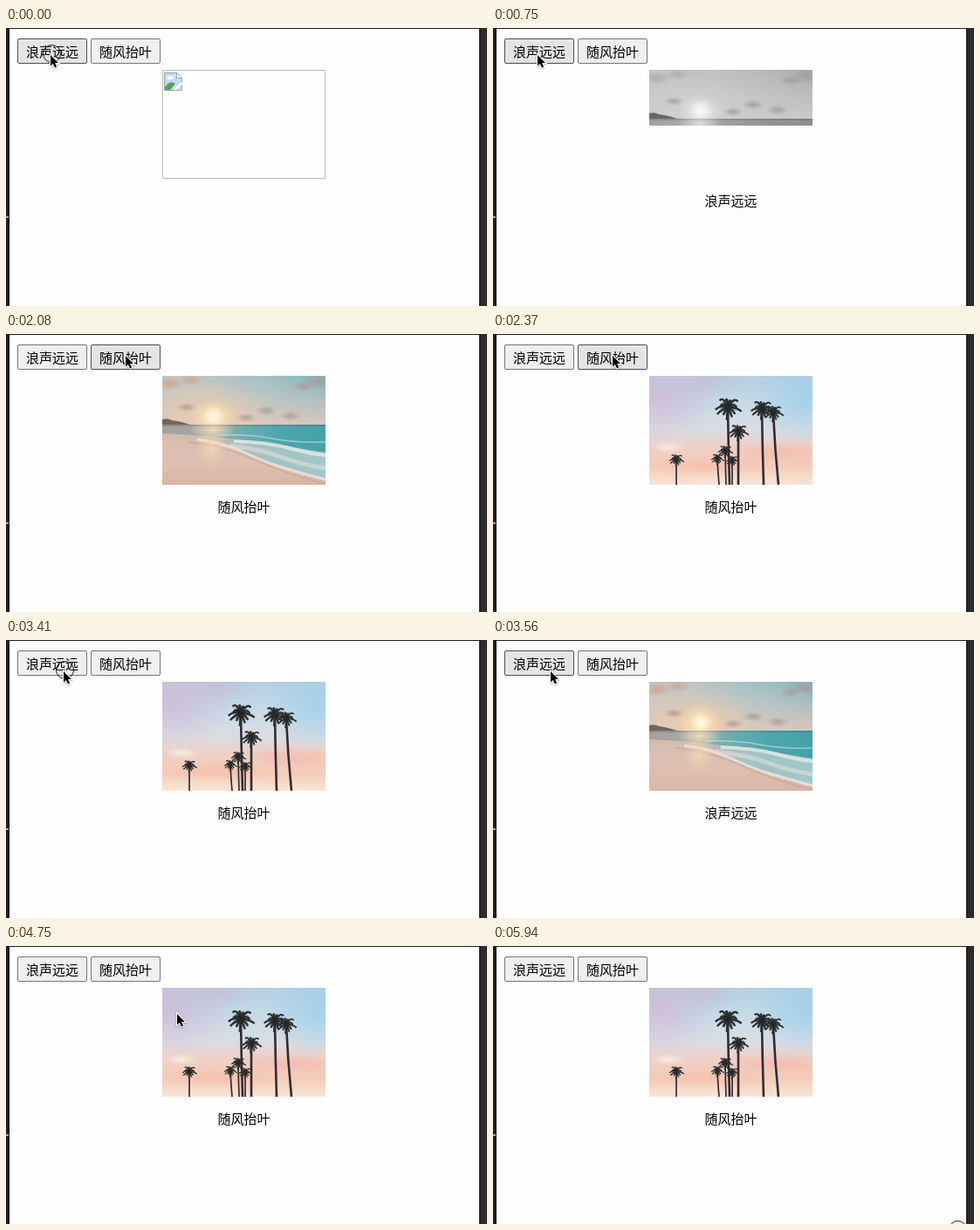
Recreate the animation shown at these times as an HTML page with a canvas. Size 551 by 319 pixels, loop 6.04 s.

```html
<!DOCTYPE html>
<html lang="zh">
<head>
<meta charset="utf-8">
<style>
html, body { margin: 0; width: 100%; height: 100%; overflow: hidden; background: #fefefe; }
#stage { position: absolute; left: 0; top: 0; width: 551px; height: 319px; overflow: hidden;
  font: 15px/20px "Noto Sans CJK SC", "Noto Sans CJK", sans-serif; color: #000; }
#stage > * { position: absolute; box-sizing: border-box; }
.edge { background: #1f1f21; }
.btn { top: 12px; width: 80px; height: 29px; line-height: 27px; text-align: center; white-space: nowrap;
  background: #efefef; border: 1px solid #767676; border-radius: 2px; }
.btn.hover { background: #e4e4e4; border-color: #4f4f4f; }
.btn.down { background: #f5f5f5; border-color: #8d8d8d; }
.pic { left: 179px; top: 48px; width: 187px; height: 125px; }
#broken { border: 1px solid #bdbdbd; }
#caption { left: 179px; top: 188px; width: 187px; text-align: center; }
#over { left: 0; top: 0; }
</style>
</head>
<body>
<div id="stage">
  <div class="edge" style="left:0;top:0;width:4px;height:319px;border-right:1px solid #0c0c0c"></div>
  <div class="edge" style="left:0;top:0;width:551px;height:1px"></div>
  <div style="left:542px;top:0;width:9px;height:319px;background:linear-gradient(90deg,#1c1c1e 1px,#2c2c2e 2px)"></div>
  <div style="left:0;top:216px;width:3px;height:2px;background:#a8a8a8"></div>
  <div class="btn" style="left:13px">浪声远远</div>
  <div class="btn" style="left:97px">随风抬叶</div>
  <div id="broken" class="pic">
    <svg width="24" height="24" style="display:block">
      <path d="M1.5 2.5H15.5L21.5 8.5V22.5H1.5Z" fill="#c4daf5" stroke="#9aa3ad"/>
      <path d="M15.5 2.5V8.5H21.5Z" fill="#fff" stroke="#9aa3ad"/>
      <ellipse cx="8" cy="8" rx="4" ry="2" fill="#fff"/>
      <path d="M2 22V19Q8 10 14 15L8 22Z" fill="#52a552"/>
      <path d="M22 14L13 22" stroke="#fefefe" stroke-width="3"/>
    </svg>
  </div>
  <canvas id="beach" class="pic" width="187" height="125"></canvas>
  <canvas id="palms" class="pic" width="187" height="125"></canvas>
  <div id="caption"></div>
  <canvas id="over" width="551" height="319"></canvas>
</div>
<script>
const $ = id => document.getElementById(id);
const W = 187, H = 125, LOOP = 6040;
const btns = [...document.querySelectorAll('.btn')];
const titles = btns.map(b => b.textContent);
const over = $('over').getContext('2d');

function linear(c, x0, y0, x1, y1, ...colors) {
  const g = c.createLinearGradient(x0, y0, x1, y1);
  colors.forEach((col, i) => g.addColorStop(i / (colors.length - 1), col));
  return g;
}
function rect(c, fill, x = 0, y = 0, w = W, h = H) {
  c.fillStyle = fill;
  c.fillRect(x, y, w, h);
}
function glow(c, x, y, r, rgb, a, sy = 1) {
  c.save();
  c.translate(x, y);
  c.scale(1, sy);
  const g = c.createRadialGradient(0, 0, 0, 0, 0, r);
  g.addColorStop(0, `rgba(${rgb},${a})`);
  g.addColorStop(1, `rgba(${rgb},0)`);
  rect(c, g, -r, -r, 2 * r, 2 * r);
  c.restore();
}
function shape(c, path, fill) {
  c.fillStyle = fill;
  c.fill(new Path2D(path));
}
function line(c, path, color, width) {
  c.strokeStyle = color;
  c.lineWidth = width;
  c.stroke(new Path2D(path));
}

function drawBeach(c) {
  rect(c, linear(c, 0, 0, W, 0, '#c9c4c0', '#b9c3c4', '#9fc0c4', '#82b4bd'), 0, 0, W, 57);
  rect(c, linear(c, 0, 0, 0, 57, 'rgba(222,205,194,0)', 'rgba(222,203,192,.5)', 'rgba(222,200,188,.95)'), 0, 0, W, 57);
  glow(c, 55, 46, 70, '246,206,164', .7, .55);
  const cloud = (x, y, r, rgb = '168,150,148') => glow(c, x, y, r, rgb, .8, .45);
  cloud(8, 9, 18, '205,160,135');
  cloud(33, 5, 14, '205,160,135');
  cloud(179, 7, 18); cloud(162, 12, 13); cloud(96, 48, 12);
  cloud(119, 40, 13); cloud(147, 46, 13); cloud(28, 36, 12);
  glow(c, 59, 47, 25, '255,232,180', 1, .8);
  glow(c, 59, 47, 13, '255,252,232', 1);
  shape(c, 'M0 50Q6 48 11 51Q20 52 32 56H0Z', '#74645a');

  // wet sand, sea, then foam
  rect(c, linear(c, 0, 56, 0, H, '#cdb4aa', '#dabfb2', '#dfbfb0', '#d9b4a5'), 0, 56, W, 69);
  shape(c, 'M40 56H187V119Q160 112 131 103T92 87T40 72Z',
    linear(c, 40, 0, W, 0, 'rgba(178,176,171,0)', '#adbfbb', '#9fc4c4', '#a3c8c9'));
  shape(c, 'M0 56H187V88Q140 80 94 74T0 66Z', linear(c, 0, 0, W, 0, '#a8a09d', '#a3aaa6', '#6cadaf', '#4ba5ac', '#45a1aa'));
  rect(c, linear(c, 0, 0, W, 0, '#8f8986', '#969a96', '#4a979e', '#3c8d98'), 0, 56, W, 2);
  line(c, 'M64 68Q100 67 126 72T187 76', 'rgba(211,228,226,.6)', 1.5);
  line(c, 'M82 75Q120 76 146 83T187 91', 'rgba(228,232,231,.85)', 4);
  line(c, 'M76 80Q112 84 136 93T187 106', 'rgba(224,224,222,.6)', 5);
  line(c, 'M40 73Q68 76 92 87T131 103T187 119', 'rgba(232,225,220,.9)', 3);
  line(c, 'M30 76Q68 80 96 92T140 110T187 124', 'rgba(189,164,154,.5)', 2);
  glow(c, 58, 62, 26, '255,226,185', .85, .45);
  glow(c, 57, 83, 18, '250,220,180', .7, 1.2);
}

function palm(c, x, y, r, foot) {
  line(c, `M${x} ${y}Q${x + (foot - x) * .3} ${(y + H) / 2} ${foot} ${H}`, '#302c35', r > 11 ? 2.6 : 1.7);
  for (let i = 0; i < 13; i++) {
    const a = i / 13 * Math.PI * 2 + .2, k = r * (.8 + .2 * Math.cos(i * 4));
    const dx = Math.cos(a) * k, dy = Math.sin(a) * k * .8;
    line(c, `M${x} ${y}Q${x + dx * .6} ${y + dy - r * .2} ${x + dx} ${y + dy + r * .15}`, '#2b302f', r * .15);
  }
  glow(c, x, y, r * .65, '35,37,38', 1);
}

function drawPalms(c) {
  rect(c, linear(c, 0, 0, 0, H, '#b5cfe3', '#c0d6e6', '#cddce7', '#dbdce2', '#efcfc4', '#f4cbb8', '#f8e6d6'));
  glow(c, 8, 24, 74, '212,180,210', .75, .7);
  glow(c, 65, 5, 44, '202,184,214', .6, .5);
  glow(c, 182, 28, 64, '151,207,235', .75, .8);
  glow(c, 150, 87, 66, '246,177,159', .55, .2);
  glow(c, 62, 103, 70, '246,184,163', .5, .17);
  glow(c, 22, 82, 20, '250,241,229', .85, .35);
  palm(c, 31, 96, 9, 31);
  palm(c, 78, 95, 8, 80);
  palm(c, 95, 97, 8, 95);
  palm(c, 87, 86, 9, 88);
  palm(c, 102, 64, 12, 102);
  palm(c, 90, 36, 16, 92);
  palm(c, 129, 38, 14, 131);
  palm(c, 142, 42, 12, 148);
}

// Each step: time plus the values that change then.
const steps = [
  [0, { x: 50, y: 29, ring: 1, pic: 'broken', title: -1, over: 0, down: 0 }],
  [150, { down: 1 }],
  [300, { ring: 0, down: 0, title: 0 }],
  [450, { pic: 'none' }],
  [750, { pic: 'gray' }],
  [900, { pic: 'beach' }],
  [1050, { x: 72, y: 28 }],
  [1200, { x: 113, y: 25, over: 1 }],
  [1330, { x: 136, y: 23 }],
  [1930, { ring: 1, down: 1 }],
  [2080, { ring: 0, down: 0, title: 1 }],
  [2370, { pic: 'palms' }],
  [2820, { x: 126, y: 26 }],
  [2970, { x: 101, y: 31 }],
  [3120, { x: 77, y: 34, over: 0 }],
  [3260, { x: 65, y: 34 }],
  [3410, { ring: 1, over: -1 }],
  [3560, { ring: 0, over: 0, title: 0, pic: 'beach' }],
  [3860, { x: 100, y: 35, over: 1 }],
  [4010, { x: 132, y: 31 }],
  [4310, { ring: 1, down: 1 }],
  [4460, { ring: 0, down: 0, title: 1, pic: 'palms' }],
  [4610, { x: 143, y: 36 }],
  [4750, { x: 195, y: 76, over: -1 }],
  [4900, { x: 294, y: 152 }],
  [5050, { x: 404, y: 236 }],
  [5190, { x: 477, y: 289 }],
  [5490, { x: 517, y: 305 }],
  [5630, { x: 530, y: 325 }],
  [5940, { ring: 1 }]
];

const arrow = new Path2D('M.5 1.5V14L3.4 11.4L5.5 16L7.6 15L5.6 10.6H9.5Z');
function drawCursor(s) {
  over.clearRect(0, 0, 551, 319);
  over.save();
  over.translate(s.x + .5, s.y + .5);
  if (s.ring) {
    over.beginPath();
    over.arc(2, 0, 10, 0, Math.PI * 2);
    over.strokeStyle = '#111';
    over.lineWidth = 1;
    over.stroke();
  }
  over.shadowColor = 'rgba(0,0,0,.3)';
  over.shadowBlur = 2;
  over.shadowOffsetY = 1;
  over.strokeStyle = '#fff';
  over.lineWidth = 2;
  over.stroke(arrow);
  over.shadowColor = 'transparent';
  over.fillStyle = '#000';
  over.fill(arrow);
  over.restore();
}

function show(s) {
  btns.forEach((b, i) => {
    b.className = 'btn' + (s.over === i ? (s.down ? ' down' : ' hover') : '');
  });
  const gray = s.pic === 'gray';
  const visible = (id, on) => { $(id).style.visibility = on ? 'visible' : 'hidden'; };
  visible('broken', s.pic === 'broken');
  visible('beach', gray || s.pic === 'beach');
  visible('palms', s.pic === 'palms');
  $('beach').style.filter = gray ? 'grayscale(1)' : 'none';
  $('beach').style.clipPath = gray ? 'inset(0 0 61px 0)' : 'none';
  $('caption').textContent = titles[s.title] || '';
  drawCursor(s);
}

let last = -1;
const start = performance.now();
function tick() {
  const t = (performance.now() - start) % LOOP;
  const past = steps.filter(p => p[0] <= t);
  if (past.length !== last) {
    last = past.length;
    show(Object.assign({}, ...past.map(p => p[1])));
  }
  requestAnimationFrame(tick);
}
drawBeach($('beach').getContext('2d'));
drawPalms($('palms').getContext('2d'));
tick();
</script>
</body>
</html>
```
